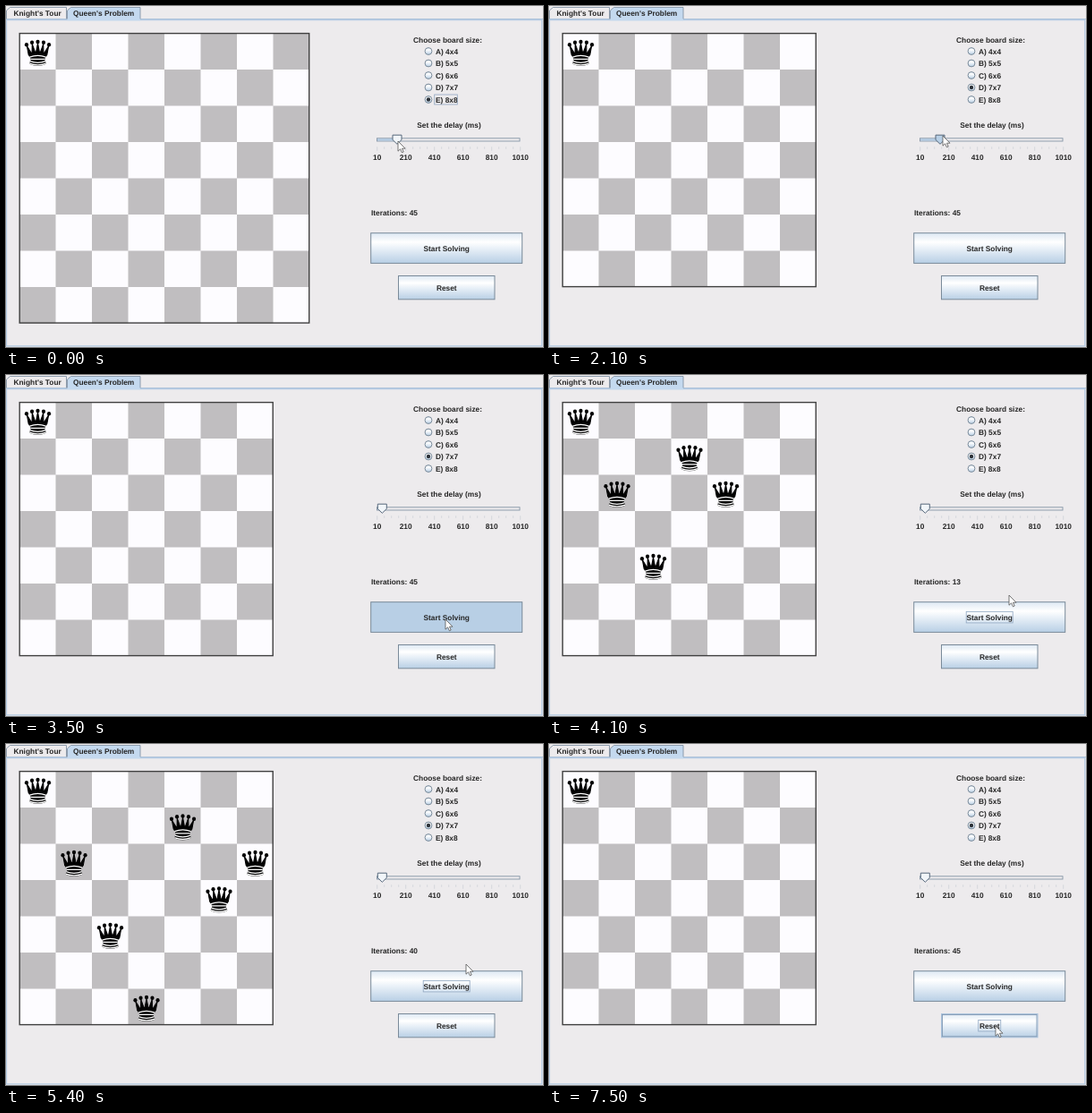
An HTML page that plays this animation: 600 px wide and 381 px high, repeating every 7.6 s.

```html
<!DOCTYPE html>
<html>
<head>
<meta charset="utf-8">
<style>
html, body { margin: 0; width: 100%; height: 100%; overflow: hidden; background: #edebed }
svg { display: block }
text { font: bold 8.35px "Liberation Sans", Arial, sans-serif; fill: #262626; text-rendering: geometricPrecision }
.mid { text-anchor: middle }
.line { fill: none; stroke: #8494a5; stroke-width: .9 }
.focus { fill: none; stroke: #8fa6c0; stroke-width: .8 }
</style>
</head>
<body>
<svg width="600" height="381" viewBox="0 0 600 381">
  <defs>
    <linearGradient id="metal" x2="0" y2="1">
      <stop stop-color="#dde8f3"/><stop offset=".3" stop-color="#fff"/>
      <stop offset=".5" stop-color="#eaf1f8"/><stop offset="1" stop-color="#b8cfe5"/>
    </linearGradient>
    <g id="queen" transform="translate(3.4 3) scale(.76 .82)">
      <path d="M9 26C17.5 24.5 30 24.5 36 26L38.5 13.5 31 25 30.7 10.9 25.5 24.5 22.5 10 19.5 24.5 14.3 10.9 14 25 6.5 13.5Z" stroke="#000" stroke-width="1.4" stroke-linejoin="round"/>
      <path d="M9 26C9 28 10.5 28 11.5 30Q12.5 31.5 12 33.5 10.5 34.5 11 36 9.5 37.5 11 38.5 22.5 43 34 38.5 35.5 37.5 34 36 34.5 34.5 33 33.5 32.5 31.5 33.5 30C34.5 28 36 28 36 26Q22.5 23.5 9 26Z"/>
      <path d="M10.5 29A35 35 0 0 1 34.5 29M12 31.6H33M11 34.5A35 35 0 0 0 34 34.5M10.5 37.4A35 35 0 0 0 34.5 37.4" fill="none" stroke="#fff" stroke-width="1.6"/>
      <circle cx="6" cy="12" r="2.75"/><circle cx="14" cy="9" r="2.75"/><circle cx="22.5" cy="8" r="2.75"/>
      <circle cx="31" cy="9" r="2.75"/><circle cx="39" cy="12" r="2.75"/>
    </g>
  </defs>
  <rect width="600" height="381" fill="#edebed"/>

  <path d="M0 15.5H598.8V379.8H.5V15.5" fill="none" stroke="#b5cbe3" stroke-width="1.3"/>
  <path d="M0 14.5H68.5M150 14.5H600" stroke="#a9c0d8" stroke-width=".9"/>
  <path class="line" d="M.5 14.4V5L4.5 1.5H67.5V14.4"/>
  <path d="M68.5 16.2V5L72.5 1.5H150V16.2Z" fill="#c4d9ef"/>
  <path class="line" d="M68.5 14.4V5L72.5 1.5H150V14.4"/>
  <text x="8.5" y="11">Knight's Tour</text>
  <text x="75" y="11">Queen's Problem</text>

  <g transform="translate(15 30.4)">
    <rect id="board" fill="#fdfcff"/>
    <path id="dark" fill="#c0bec0"/>
    <rect id="edge" x=".2" y=".2" fill="none" stroke="#404040" stroke-width="1.4"/>
    <g id="queens"></g>
  </g>

  <text class="mid" x="493.5" y="40.7">Choose board size:</text>
  <g id="radios"></g>
  <rect id="radioFocus" class="focus" x="478.7" width="25.6" height="11"/>

  <text class="mid" x="495" y="135.6">Set the delay (ms)</text>
  <rect class="line" x="414.5" y="147.8" width="159.5" height="3.2"/>
  <rect id="fill" x="415" y="148.2" height="2.4" fill="#b0c8e0"/>
  <g id="ticks"></g>
  <path id="thumb" d="M-5 144.2H5V149.5L0 154.3-5 149.5Z" stroke="#56677a"/>

  <text id="count" x="408" y="233.7"></text>
  <g id="start"></g>
  <g id="reset"></g>
  <path id="cursor" d="M0 0V11.2L2.6 8.8 4.4 12.8 6.2 12 4.5 8.2H8Z" fill="#fff" stroke="#555" stroke-width=".8"/>
</svg>
<script>
const LOOP = 7600, CELL = 40.5;
const $ = id => document.getElementById(id);
const set = (el, attrs) => { for (const k in attrs) el.setAttribute(k, attrs[k]); };
const show = (el, on) => el.setAttribute('visibility', on ? 'visible' : 'hidden');

// Static rows of radio buttons and slider ticks
const radioY = i => 50.5 + 13.5 * i;
$('radios').innerHTML = [4, 5, 6, 7, 8].map((n, i) => `
  <circle cx="472" cy="${radioY(i)}" r="3.9" fill="url(#metal)" stroke="#7a8a99"/>
  <circle cx="472" cy="${radioY(i)}" r="2.2" fill="#2c3138" class="dot"/>
  <text x="480" y="${radioY(i) + 3}">${'ABCDE'[i]}) ${n}x${n}</text>`).join('');
const dots = document.querySelectorAll('.dot');

let ticks = '';
for (let i = 0; i <= 20; i++) {
  const x = 414.7 + 8 * i, major = i % 4 == 0;
  ticks += `<path d="M${x} 157.3v${major ? 4.5 : 2.5}" stroke="#cdd1d7" stroke-width=".8"/>`;
  if (major) ticks += `<text class="mid" x="${x}" y="171.8">${10 + 50 * i}</text>`;
}
$('ticks').innerHTML = ticks;

function makeButton(id, label, x, y, w, h, fw) {
  const cx = x + w / 2, cy = y + h / 2, g = $(id);
  g.innerHTML = `<rect x="${x}" y="${y}" width="${w}" height="${h}"/>
    <rect x="${x + 1}" y="${y + 1}" width="${w - 2}" height="${h - 2}" fill="none" stroke="#8299b3" stroke-width=".9"/>
    <text class="mid" x="${cx}" y="${cy + 3.8}">${label}</text>
    <rect class="focus" x="${cx - fw / 2}" y="${cy - 6.2}" width="${fw}" height="12.6"/>`;
  const [face, glow, , focus] = g.children;
  return (px, py, pressed, focused) => {
    const hover = !pressed && px > x && px < x + w && py > y && py < y + h;
    set(face, { fill: pressed ? '#b8cfe5' : 'url(#metal)', stroke: hover ? '#a9c2dc' : '#7a8a99' });
    show(glow, hover);
    show(focus, focused);
  };
}
const startButton = makeButton('start', 'Start Solving', 407.7, 253.7, 169, 33.7, 52);
const resetButton = makeButton('reset', 'Reset', 438.5, 301.5, 107.5, 26.3, 25);

// Every tried position of the backtracking search; a step back counts too
function solve(n) {
  const rows = [0], steps = [];
  for (;;) {
    steps.push([...rows]);
    const k = rows.length - 1;
    const safe = rows.every((r, c) => c == k || r != rows[k] && Math.abs(r - rows[k]) != k - c);
    if (safe) {
      if (k == n - 1) return steps;
      rows.push(0);
      continue;
    }
    while (rows[rows.length - 1] == n - 1) {
      rows.pop();
      steps.push([...rows]);
    }
    rows[rows.length - 1]++;
  }
}
const steps = solve(7);

// time, x, y of the pointer tip
const path = [
  [0, 438, 151], [300, 438, 151], [1000, 482, 94], [1300, 482, 94], [2000, 440, 145],
  [2200, 440, 145], [2500, 423, 146], [2700, 423, 146], [3200, 491, 273], [3600, 491, 273],
  [4000, 514, 246], [5700, 514, 246], [6200, 506, 277], [6550, 506, 277], [7000, 499, 315],
  [LOOP, 499, 315]
];
const ease = u => u * u * (3 - 2 * u);
const mix = (a, b, u) => a + (b - a) * ease(Math.min(1, Math.max(0, u)));
function pointer(t) {
  const i = path.findIndex(p => p[0] > t);
  const [t0, x0, y0] = path[i - 1], [t1, x1, y1] = path[i];
  const u = (t - t0) / (t1 - t0);
  return [mix(x0, x1, u), mix(y0, y1, u)];
}

function drawBoard(n, rows) {
  const size = n * CELL;
  set($('board'), { width: size, height: size });
  set($('edge'), { width: size - .5, height: size - .5 });
  let d = '';
  for (let i = 0; i < n * n; i++) {
    const c = i % n, r = (i - c) / n;
    if ((c + r) % 2) d += `M${c * CELL} ${r * CELL}h${CELL}v${CELL}h-${CELL}z`;
  }
  set($('dark'), { d });
  $('queens').innerHTML = rows.map((r, c) =>
    `<use href="#queen" x="${c * CELL}" y="${r * CELL}"/>`).join('');
}

let drawn = '';
function frame(now) {
  const t = now % LOOP, [px, py] = pointer(t);
  const n = t < 1200 ? 8 : 7;
  const count = t < 3600 ? 45 : Math.min(45, Math.floor(30.2 + (t - 4900) / 47));
  const solving = t >= 3600 && t < 7300;
  const rows = solving ? steps[Math.min(count, steps.length - 1)] : [0];
  const key = n + ':' + rows;
  if (key != drawn) drawBoard(n, rows);
  drawn = key;

  dots.forEach((dot, i) => show(dot, i == n - 4));
  set($('radioFocus'), { y: radioY(n - 4) - 5.5 });
  show($('radioFocus'), t < 2050);

  const thumb = mix(437, 420.3, (t - 2200) / 300);
  set($('thumb'), {
    transform: `translate(${thumb})`,
    fill: t >= 2050 && t < 2600 ? '#b8cfe5' : '#f1f5f9'
  });
  set($('fill'), { width: thumb - 415 });

  $('count').textContent = 'Iterations: ' + count;
  startButton(px, py, t >= 3300 && t < 3600, t >= 3600 && t < 7200);
  resetButton(px, py, t >= 7200 && t < 7300, t >= 7200);
  set($('cursor'), { transform: `translate(${px} ${py})` });
  requestAnimationFrame(() => frame(performance.now() - begin));
}
const begin = performance.now();
frame(0);
</script>
</body>
</html>
```
